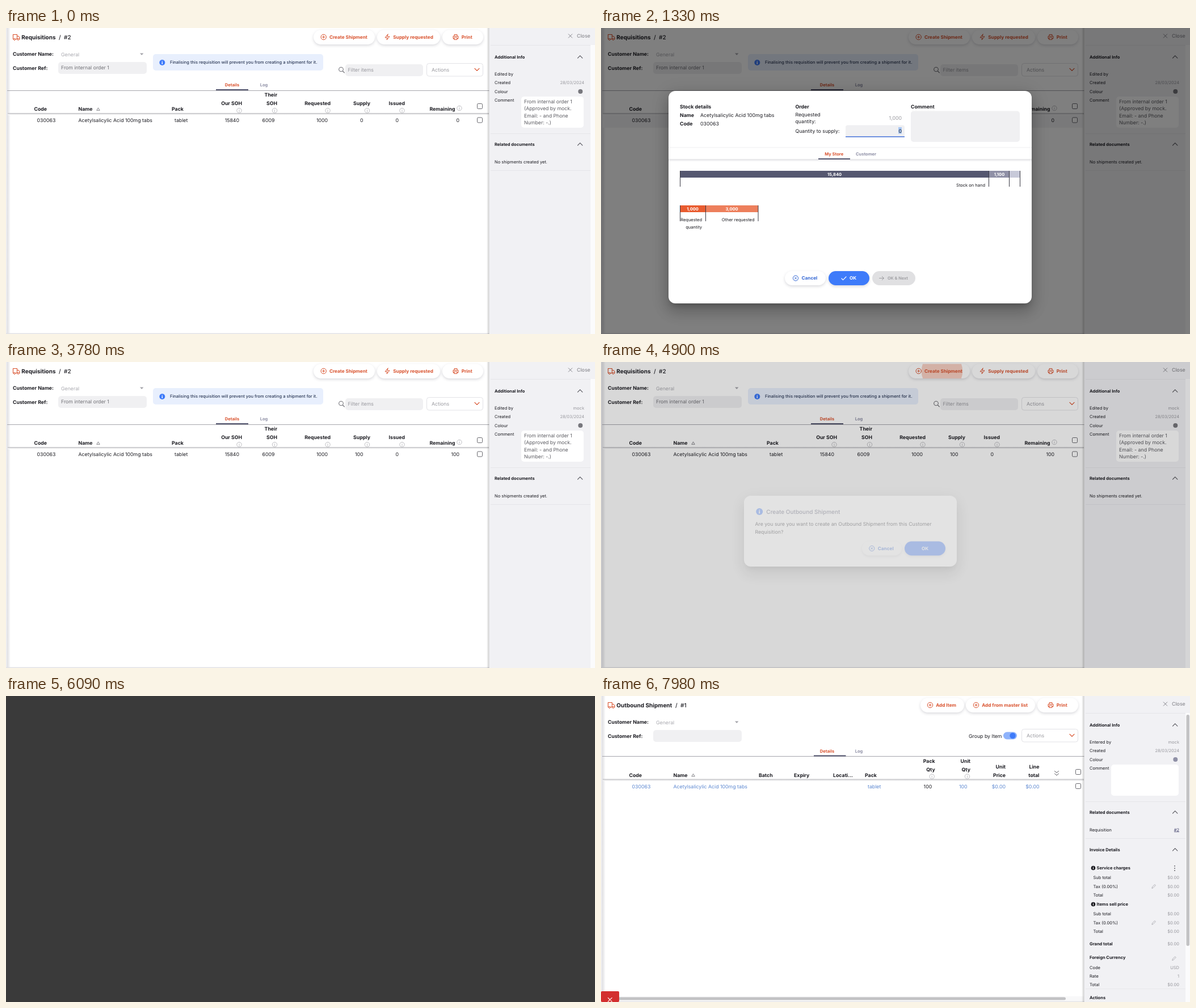
Write an HTML page that moves like this. It is 1038x540 px and loops after 8 s.

```html
<!DOCTYPE html>
<html lang="en">
<head>
<meta charset="utf-8">
<title>Requisition to shipment</title>
<style>
  html, body { margin: 0; width: 100%; height: 100%; overflow: hidden; background: #fff; }
  #stage { position: relative; width: 1038px; height: 540px; overflow: hidden; }
  svg, .overlay, .veil, .pane { position: absolute; left: 0; top: 0; width: 1038px; height: 540px; }
  svg { font-family: Inter, sans-serif; overflow: hidden; }
  text { white-space: pre; text-rendering: geometricPrecision; }
  .veil { background: rgba(0, 0, 0, .5); }
  .card {
    position: absolute; background: #fff; border-radius: 12px;
    box-shadow: 0 7px 9px -4px rgba(0,0,0,.2), 0 15px 24px 2px rgba(0,0,0,.14), 0 6px 29px 5px rgba(0,0,0,.12);
  }
  .raised { filter: drop-shadow(0 2px 2.4px rgba(96,97,112,.24)); }
</style>
</head>
<body>
<div id="stage">
  <svg id="requisition"></svg>
  <svg id="shipment"></svg>
  <div class="overlay" id="stock">
    <div class="veil"></div>
    <div class="pane">
      <div class="card" style="left:119px;top:111px;width:640px;height:375px"></div>
      <svg id="stockBody"></svg>
    </div>
  </div>
  <div class="overlay" id="confirm">
    <div class="veil"></div>
    <div class="pane">
      <div class="card" style="left:252px;top:236px;width:375px;height:125px"></div>
      <svg id="confirmBody"></svg>
    </div>
  </div>
  <div class="overlay" id="blackout"><div class="veil" style="background:#3a3a3a"></div></div>
</div>
<script>
const ORANGE = '#d9532f', BLUE = '#3e7bfa', INK = '#1c1c22', GREY = '#98989e', FIELD = '#f0f0f2';
const SLATE = '#555770', MIST = '#8f90a6', LINK = '#5b87d0';
const $ = id => document.getElementById(id);

// --- drawing helpers; text is placed by the middle of its capitals ---
const text = (x, y, s, { size = 8.75, weight = 400, fill = INK, anchor = 'start', id = '' } = {}) =>
  `<text ${id && `id="${id}"`} x="${x}" y="${y + size * .36}" font-size="${size}" font-weight="${weight}" fill="${fill}" text-anchor="${anchor}">${s}</text>`;
const bold = (x, y, s, o) => text(x, y, s, { weight: 700, ...o });
const right = (x, y, s, o) => text(x, y, s, { anchor: 'end', ...o });
const boldRight = (x, y, s) => right(x, y, s, { weight: 700 });
const small = (x, y, s, o) => text(x, y, s, { size: 7.5, ...o });
const box = (x, y, w, h, fill, r = 0, more = '') =>
  `<rect x="${x}" y="${y}" width="${w}" height="${h}" rx="${r}" fill="${fill}" ${more}/>`;
const stroke = (d, color = INK, w = 1) =>
  `<path d="${d}" fill="none" stroke="${color}" stroke-width="${w}" stroke-linecap="round" stroke-linejoin="round"/>`;
const dot = (x, y, r, fill, more = '') => `<circle cx="${x}" cy="${y}" r="${r}" fill="${fill}" ${more}/>`;
const ring = (x, y, r, color, w = 1) => dot(x, y, r, 'none', `stroke="${color}" stroke-width="${w}"`);
// k is how much of the side panel's width a part gives way by
const pull = (k, ...parts) => `<g data-pull="${k}">${parts.join('')}</g>`;

const plus = (x, y) => ring(x, y, 4.7, ORANGE) + stroke(`M${x - 2.2} ${y}h4.4M${x} ${y - 2.2}v4.4`, ORANGE);
const cross = (x, y, r, color, w = 1) => stroke(`M${x - r} ${y - r}l${2 * r} ${2 * r}m0 ${-2 * r}l${-2 * r} ${2 * r}`, color, w);
const bolt = (x, y) => stroke(`M${x + 1} ${y - 5}l-5 6h4l-1 4 5-6h-4z`, ORANGE);
const printer = (x, y) => stroke(`M${x - 2.5} ${y - 1.5}v-3h5v3M${x - 2.5} ${y + 2.5}h-2v-4h9v4h-2M${x - 2.5} ${y + 1}h5v3.5h-5z`, ORANGE);
const truck = stroke('M12.5 11.5h7v8h-7zM19.5 14.5h2.5l2 2.5v2.5h-4.5', ORANGE, 1.1) +
  dot(15, 20, 1.5, '#fff', `stroke="${ORANGE}"`) + dot(21.5, 20, 1.5, '#fff', `stroke="${ORANGE}"`);
const info = (x, y) => ring(x, y, 4.2, '#a4a4aa', .7) + stroke(`M${x} ${y - .2}v2M${x} ${y - 2}v.1`, '#a4a4aa', .8);
const badge = (x, y, r, fill) => dot(x, y, r, fill) +
  stroke(`M${x} ${y - .3}v${r * .5}M${x} ${y - r * .45}v.1`, '#fff', r * .3);
const checkbox = (x, y) => box(x + .5, y + .5, 9, 9, '#fff', 1.8, 'stroke="#68686e"');
const chevronUp = y => stroke(`M1007.5 ${y + 2.2}l4.2-4.4 4.2 4.4`, '#55555c', 1.1);
const pencil = (x, y, s = 1) => stroke(`M${x - 3 * s} ${y + 3 * s}l.6-2.2 4.2-4.2 1.6 1.6-4.2 4.2z`, GREY, .7);
const pill = (x, y, w, h, fill, id = '') => box(x, y, w, h, fill, h / 2, `class="raised" ${id && `id="${id}"`}`);
const action = (x, w, icon, iconX, label, extra = '') =>
  pill(x, 3.5, w, 25.5, '#fff') + extra + icon(iconX, 16) + bold(iconX + 10.2, 16, label, { size: 8.2, fill: ORANGE });
const select = y => box(741.5, y + .5, 99, 22.5, '#fff', 4, 'stroke="#e2e2e6"') +
  text(750, y + 12, 'Actions', { fill: GREY }) + stroke(`M826 ${y + 9.4}l4 4 4-4`, ORANGE, 1.3);
const cancel = (x, y) => ring(x, y, 4.6, '#3568d4') + cross(x, y, 1.6, '#3568d4') +
  bold(x + 10.5, y, 'Cancel', { size: 8.2, fill: '#3568d4' });
const tabs = y => pull(.5,
  bold(398.5, y, 'Details', { size: 7.5, fill: ORANGE, anchor: 'middle' }),
  bold(454.5, y, 'Log', { size: 7.5, fill: MIST, anchor: 'middle' }));

const frame = (lineY, name) => `<defs><linearGradient id="${name}Edge"><stop stop-color="#dedee2"/><stop offset="1" stop-color="#fff"/></linearGradient>
  <linearGradient id="${name}Fall" x2="0" y2="1"><stop stop-color="#bcbcc0"/><stop offset="1" stop-color="#fff"/></linearGradient></defs>` +
  box(0, 0, 1038, 540, '#fff') + box(0, 0, 2, 540, '#ececef') + box(2, 0, 6, 540, `url(#${name}Edge)`) +
  box(0, 538.5, 1038, 1.5, '#e2e2e5') + box(2, lineY, 1036, 1, '#a6a6ac');
const headShadow = (y, name) => box(3, y, 848, 3.5, `url(#${name}Fall)`);
const heading = (title, slashX, number) => truck + bold(27.3, 16, title, { size: 10 }) +
  text(slashX, 16, '/', { size: 10, weight: 500 }) + text(slashX + 9, 16, number, { size: 10, weight: 500 }) +
  bold(12, 46, 'Customer Name:') + text(97, 47, 'General', { fill: '#aaaab0' }) +
  `<path d="M236 44.5h6.4l-3.2 3.4z" fill="#a4a4aa"/>` +
  bold(12, 71, 'Customer Ref:') + box(92, 60, 156, 21, FIELD, 5);
const sortMark = y => stroke(`M160 ${y + 2}l2.5-4.2 2.5 4.2z`, '#66666c', .8);

const divider = y => box(854, y, 176, .8, '#e3e3e7');
const section = (y, title) => small(861, y, title, { weight: 700 }) + chevronUp(y);
const pair = (y, label, value, x = 861, o = {}) => small(x, y, label) + small(1019, y, value, { fill: GREY, anchor: 'end', ...o });
const panel = (name, parts) => `<linearGradient id="${name}Side"><stop stop-opacity="0"/><stop offset="1" stop-opacity=".22"/></linearGradient>` +
  pull(1, box(847, 0, 5, 540, `url(#${name}Side)`), box(851.5, 0, 187, 540, '#f1f1f4'), box(1030, 30, 8, 510, '#fbfbfc'),
    cross(994.5, 14, 3.2, '#77777d', .9), text(1006, 14, 'Close', { weight: 500, fill: '#8c8c92' }),
    divider(30), section(51, 'Additional Info'), small(861, 127, 'Comment'),
    divider(186), section(205, 'Related documents'), divider(251), ...parts);

// --- requisition page ---
$('requisition').innerHTML = [
  frame(110, 'req'), heading('Requisitions', 93, '#2'),
  text(97, 70, 'From internal order 1', { fill: '#707076' }),
  action(542, 108, plus, 559.7, 'Create Shipment',
    `<clipPath id="pillClip">${box(542, 3.5, 108, 25.5, '#fff', 12.75)}</clipPath><g clip-path="url(#pillClip)">${dot(601, 16, 61, '#e95c30', 'id="ripple"')}</g>`),
  action(654, 111, bolt, 672, 'Supply requested'), action(769, 72, printer, 792.5, 'Print'),
  box(259, 46, 300, 29, '#e8effd', 5), badge(275.3, 61, 5, BLUE),
  small(289, 60.7, 'Finalising this requisition will prevent you from creating a shipment for it.', { weight: 500, fill: '#2b3854' }),
  ring(590.5, 73, 3.8, '#707076', 1.1), stroke('M593.4 76l3 3', '#707076', 1.1),
  box(598, 64, 137, 21, FIELD, 5, 'id="filter"'), text(602.5, 73.5, 'Filter items', { fill: GREY }), select(62),
  tabs(100.5), box(370, 108, 57, 2, SLATE),
  box(3, 151, 846, 25, '#f3f3f6', 0, 'id="rowHover"'), headShadow(150, 'req'),
  bold(49.5, 143, 'Code'), bold(127.5, 143, 'Name'), sortMark(143), bold(292, 143, 'Pack'),
  boldRight(478, 118, 'Their'),
  ...[[416, 'Our SOH', 411], [478, 'SOH', 473.5], [572, 'Requested', 567], [642, 'Supply', 636.5], [703, 'Issued', 698]]
    .map(([x, label, iconX]) => boldRight(x, 133, label) + info(iconX, 145.7)),
  boldRight(791.5, 143, 'Remaining'), info(799, 141.5), checkbox(830, 133),
  text(54.5, 163, '030063'), text(127.5, 163, 'Acetylsalicylic Acid 100mg tabs'), text(297, 163, 'tablet'),
  right(411, 163, '15840'), right(473.5, 163, '6009'), right(567, 163, '1000'),
  right(629.5, 163, '0', { id: 'supply' }), right(692, 163, '0'), right(799, 163, '0', { id: 'remaining' }),
  checkbox(830, 157.5),
  panel('req', [
    small(861, 81.5, 'Edited by'), small(1019, 81.5, 'mock', { fill: GREY, anchor: 'end', id: 'editor' }),
    pair(96.5, 'Created', '28/03/2024'), small(861, 112, 'Colour'), dot(1012.3, 112, 4, '#77777d'),
    box(908, 121, 110, 55, '#fff', 5),
    ...['From internal order 1', '(Approved by mock.', 'Email: - and Phone', 'Number: -.)']
      .map((line, i) => text(913, 129.5 + i * 12.5, line, { fill: '#5c5c62' })),
    small(861, 236, 'No shipments created yet.')
  ])
].join('');

// --- shipment page ---
const column = (x, ...parts) => pull((x / 845).toFixed(2), ...parts);
const money = (x, label1, label2) => column(x, boldRight(x, 124.5, label1), boldRight(x, 139.5, label2), right(x, 159.5, '$0.00', { fill: LINK }));
const quantity = (x, label, color) => column(x, boldRight(x, 114.5, label), boldRight(x, 129.5, 'Qty'), info(x - 5.5, 142),
  right(x - 5.5, 159.5, '100', { fill: color }));
const charges = (y, title) => badge(867.5, y + .5, 3.8, INK) + small(873.5, y, title, { weight: 700 }) +
  pair(y + 17.5, 'Sub total', '$0.00', 867.5) + pair(y + 33, 'Tax (0.00%)', '$0.00', 867.5) + pencil(974, y + 33) +
  pair(y + 48.5, 'Total', '$0.00', 867.5);

$('shipment').innerHTML = [
  frame(106, 'ship'), heading('Outbound Shipment', 131, '#1'),
  pull(1, action(563, 77, plus, 580, 'Add Item'), action(643, 122, plus, 661, 'Add from master list'),
    action(769, 72, printer, 792.5, 'Print'), text(648, 70.5, 'Group by Item'),
    box(709, 63.5, 24, 13, '#8fb3fb', 6.5), dot(725.5, 70, 5.2, BLUE), select(58)),
  tabs(97), box(370, 104.5, 56.5, 2, SLATE, 0, 'id="indicator"'), headShadow(146.5, 'ship'),
  bold(49.5, 139.5, 'Code'), text(54.5, 159.5, '030063', { fill: LINK }),
  bold(127.5, 139.5, 'Name'), sortMark(139.5), text(127.5, 159.5, 'Acetylsalicylic Acid 100mg tabs', { fill: LINK }),
  column(278, bold(278, 139.5, 'Batch')), column(340, bold(340, 139.5, 'Expiry')), column(409, bold(409, 139.5, 'Locati...')),
  column(465, bold(465, 139.5, 'Pack'), text(470, 159.5, 'tablet', { fill: LINK })),
  quantity(588.7, 'Pack', INK), quantity(651, 'Unit', LINK), money(713, 'Unit', 'Price'), money(772.5, 'Line', 'total'),
  pull(1, stroke('M799.5 132.5l3.5 3 3.5-3m-7 4.5l3.5 3 3.5-3', '#55555c'), checkbox(836, 129), checkbox(836, 154)),
  box(3, 530, 848, 8.5, '#f8f8f9'), box(8, 531.5, 811, 5, '#c2c2c4', 2.5),
  box(0, 521, 32, 19, '#d32f2f', 2), cross(15.8, 536, 3.4, '#fff', 1.2),
  panel('ship', [
    box(1031.5, 33, 5.5, 408, '#c2c2c4', 2.7),
    pair(81.5, 'Entered by', 'mock'), pair(96.5, 'Created', '28/03/2024'),
    small(861, 112, 'Colour'), dot(1012.3, 112, 4, MIST), box(899, 121, 119, 55, '#fff', 5),
    pair(236, 'Requisition', '#2', 861, { fill: '#3c3c68' }), box(1010, 239.5, 9, .7, '#3c3c68'),
    section(271, 'Invoice Details'), charges(303, 'Service charges'), charges(367, 'Items sell price').replaceAll('$0.00', '$0.00'),
    ...[300, 304, 308].map(y => dot(1011, y, 1, '#66666c')),
    small(861, 437, 'Grand total', { weight: 700 }), small(1019, 437, '$0.00', { fill: GREY, anchor: 'end' }),
    small(861, 461.5, 'Foreign Currency', { weight: 700 }), pencil(1011, 462, 1.4),
    pair(479, 'Code', 'USD'), pair(494, 'Rate', '1'), pair(509.5, 'Total', '$0.00'),
    divider(516.5), small(861, 532.5, 'Actions', { weight: 700 })
  ])
].join('');

// --- stock dialog ---
const bar = (x, y, w, fill, label = '') => box(x, y, w, 12, fill) +
  small(x + w / 2, y + 6, label, { weight: 700, fill: '#fff', anchor: 'middle' });
const tick = (x, y) => box(x, y, 1, 28, '#3a3a44');
$('stockBody').innerHTML = [
  bold(139, 139, 'Stock details'), bold(139, 154, 'Name'), text(175, 154, 'Acetylsalicylic Acid 100mg tabs'),
  bold(139, 169, 'Code'), text(175, 169, '030063'),
  bold(342.5, 139, 'Order'), text(342.5, 153, 'Requested'), text(342.5, 165.3, 'quantity:'),
  right(530, 158.5, '1,000', { fill: GREY }), text(342.5, 182, 'Quantity to supply:'),
  box(431, 171.5, 104, 21, FIELD, 4), box(431, 191.2, 104, 1.4, '#3a6ad8'),
  box(524, 175, 6, 11.5, '#a9c8f5', 0, 'id="selection"'), right(530, 181.5, '0', { id: 'typed' }),
  box(529.5, 175, .8, 11, INK, 0, 'id="caret"'),
  bold(546, 139, 'Comment'), box(546, 146.5, 192, 54.5, FIELD, 5),
  box(119, 210.5, 640, .8, '#ebebee'),
  small(410.7, 222, 'My Store', { weight: 700, fill: ORANGE, anchor: 'middle' }),
  small(467, 222, 'Customer', { weight: 700, fill: MIST, anchor: 'middle' }),
  box(119, 231.5, 640, 1.2, '#d6d6da'), box(119, 232.7, 640, 2.3, '#f1f1f3'), box(383, 230, 56, 2, SLATE),
  bar(139, 252, 545, SLATE, '15,840'), bar(684, 252, 36, MIST, '1,100'), bar(720, 252, 19, '#c7c9d9'),
  ...[139, 683, 719, 738].map(x => tick(x, 252)), small(677, 277, 'Stock on hand', { anchor: 'end' }),
  bar(139, 313, 45, '#e95c30', '1,000'), bar(184, 313, 93, '#ed7f5c', '3,000'),
  ...[139, 184, 276.5].map(x => tick(x, 313)),
  small(178, 338, 'Requested', { anchor: 'end' }), small(178, 351, 'quantity', { anchor: 'end' }),
  small(270.5, 338, 'Other requested', { anchor: 'end' }),
  pill(324, 429, 72, 25, '#fff'), cancel(343, 441.5),
  pill(401, 429, 72, 25, BLUE, 'stockOk'), stroke('M424 442l2.5 2.6 5.5-5.6', '#fff', 1.2),
  bold(438, 441.5, 'OK', { size: 8.2, fill: '#fff' }),
  box(478, 429, 76, 25, '#e0e0e2', 12.5), stroke('M490.5 441.5h8m-3.2-3.2l3.2 3.2-3.2 3.2', '#9c9ca0'),
  bold(505, 441.5, 'OK &amp; Next', { size: 7.3, fill: '#a2a2a6' })
].join('');

// --- confirmation dialog ---
$('confirmBody').innerHTML = [
  badge(279.2, 264, 6, BLUE), text(291.3, 264, 'Create Outbound Shipment', { size: 10, weight: 500, fill: SLATE }),
  text(271.5, 285.5, 'Are you sure you want to create an Outbound Shipment from this Customer'),
  text(271.5, 300.3, 'Requisition?'),
  pill(460, 316.5, 70, 25, '#fff'), cancel(477.3, 329),
  pill(535, 316.5, 72, 25, BLUE, 'confirmOk'), bold(571, 329, 'OK', { size: 8.2, fill: '#fff', anchor: 'middle' })
].join('');

// --- motion ---
const STEP = 70, LOOP = 8000;
const clamp = v => Math.min(1, Math.max(0, v));
// standard material curve, cubic-bezier(.4, 0, .2, 1)
function ease(x) {
  let lo = 0, hi = 1, u = .5;
  for (let i = 0; i < 20; i++) {
    u = (lo + hi) / 2;
    const at = 1.2 * u * (1 - u) ** 2 + .6 * u * u * (1 - u) + u ** 3;
    if (at < x) lo = u; else hi = u;
  }
  return 3 * u * u * (1 - u) + u ** 3;
}
const ramp = (t, from, length) => ease(clamp((t - from) / length));
const within = (t, from, to) => t >= from && t < to;
const show = (id, visible) => { $(id).style.display = visible ? '' : 'none'; };
// veil and pane fade side by side, so a half-shown card lets the dimmed page through
const fade = (id, value) => {
  show(id, value > .001);
  for (const layer of $(id).children) layer.style.opacity = value;
};
const okColor = p => `rgb(${62 - 12 * p},${123 - 24 * p},${250 - 45 * p})`;
const pulled = document.querySelectorAll('#shipment [data-pull]');

function render(t) {
  const saved = t >= 3640;
  show('requisition', t < 6090);
  show('shipment', t >= 7000);
  show('rowHover', within(t, 630, 3640));
  show('editor', saved);
  $('supply').textContent = $('remaining').textContent = saved ? '100' : '0';
  $('filter').setAttribute('fill', within(t, 4340, 4410) ? '#e7e7ea' : FIELD);

  fade('stock', ramp(t, 1090, 225) - ramp(t, 3550, 195));
  show('selection', t < 2240);
  show('caret', within(t, 2240, 3080));
  $('typed').textContent = t < 2240 ? '0' : t < 2380 ? '1' : t < 2520 ? '10' : '100';
  $('stockOk').setAttribute('fill', okColor(t >= 3360 ? 1 : 0));

  const grow = ramp(t, 4685, 550);
  $('ripple').setAttribute('r', 61 * grow);
  $('ripple').setAttribute('opacity', (.1 + .2 * Math.min(1, grow * 2)) * (1 - ramp(t, 4820, 550)));

  fade('confirm', t < 6090 ? ramp(t, 4838, 225) : 0);
  $('confirmOk').setAttribute('fill', okColor(ramp(t, 5510, 230)));
  fade('blackout', t < 6790 ? ramp(t, 5860, 225) : 0);

  const room = 187 * (1 - ramp(t, 7250, 350));
  pulled.forEach(g => g.setAttribute('transform', `translate(${g.dataset.pull * room} 0)`));
  $('indicator').setAttribute('x', 370 + 93 * Math.min(1, Math.exp((7600 - t) / 130)));
}

function play() {
  const t = performance.now() % LOOP;
  render(Math.floor(t / STEP) * STEP);
  requestAnimationFrame(play);
}
play();
</script>
</body>
</html>
```
